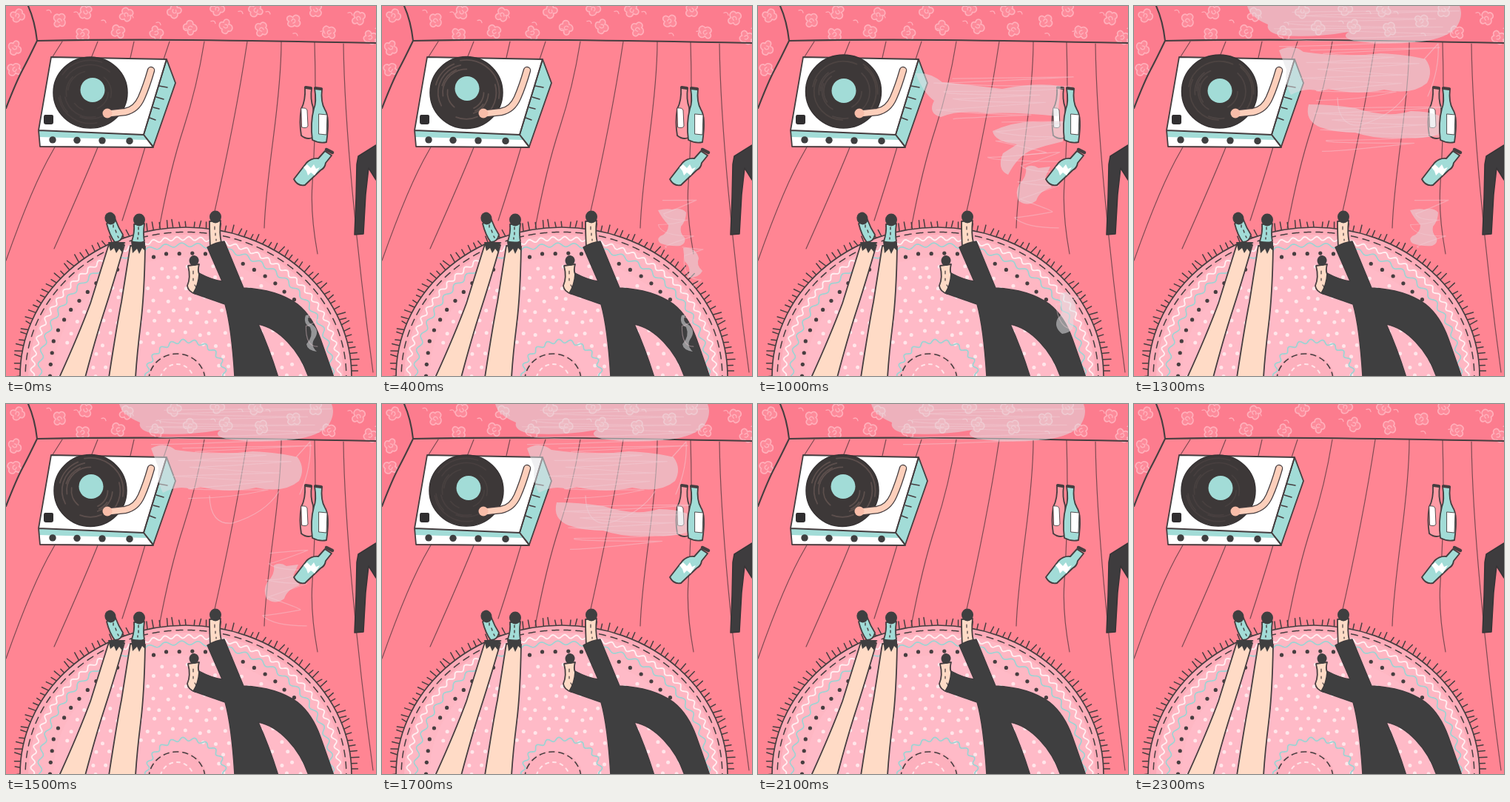
Recreate the animation shown at these times as an HTML page with a canvas. Size 500 by 500 pixels, loop 2400 ms.

```html
<!DOCTYPE html>
<html>
<head>
<meta charset="utf-8">
<style>
html, body { margin: 0; width: 100%; height: 100%; overflow: hidden; background: #ff8593; }
canvas { display: block; width: 100vw; height: 100vh; }
</style>
</head>
<body>
<canvas id="stage" width="500" height="500"></canvas>
<script>
const INK = '#463e40', TEAL = '#a2dcd7', SKIN = '#ffdbc6', BLACK = '#3f3f40';
const stage = document.getElementById('stage').getContext('2d');
const room = document.createElement('canvas');
room.width = room.height = 500;
let g = room.getContext('2d');

function seeded(seed) {
  return () => {
    seed = (seed * 16807) % 2147483647;
    return seed / 2147483647;
  };
}

function shape(d, fill, stroke, width = 1.8) {
  const p = new Path2D(d);
  if (fill) { g.fillStyle = fill; g.fill(p); }
  if (stroke) { g.strokeStyle = stroke; g.lineWidth = width; g.stroke(p); }
}

function oval(x, y, rx, ry, fill, stroke, width = 1.5, tilt = 0) {
  g.beginPath();
  g.ellipse(x, y, rx, ry, tilt, 0, Math.PI * 2);
  if (fill) { g.fillStyle = fill; g.fill(); }
  if (stroke) { g.strokeStyle = stroke; g.lineWidth = width; g.stroke(); }
}

function soften(ctx) { ctx.lineCap = ctx.lineJoin = 'round'; }

function drawFlower(x, y, turn) {
  g.save();
  g.translate(x, y);
  g.rotate(turn);
  shape('M-2 -4C-2 -11 9 -10 7 -3C13 -2 10 8 4 5C2 11 -8 9 -5 3C-12 2 -9 -8 -2 -4Z',
    'rgba(255,180,190,.25)', '#ffb0bb', 1.7);
  shape('M-2 1Q-2 -4 2 -2Q4 1 1 3', null, '#ffb0bb', 1.4);
  g.restore();
}

function drawWalls() {
  g.fillStyle = '#ff8593';
  g.fillRect(0, 0, 500, 500);
  shape('M0 0H500V50Q250 43 42 47L22 85L0 138Z', '#fc7c8e');
  const spots = [[15, 13], [12, 56], [12, 86], [72, 20], [103, 38], [108, 8], [152, 35], [162, 12],
    [203, 36], [228, 7], [249, 30], [285, 4], [297, 27], [338, 6], [345, 32], [388, 20],
    [419, 5], [437, 36], [476, 17], [492, 42]];
  spots.forEach(([x, y], i) => drawFlower(x, y, i * 1.7));
  const rnd = seeded(31);
  for (let x = 55; x < 500; x += 37) {
    const y = 6 + rnd() * 32;
    shape(`M${x} ${y}q5 -2 6 3`, null, '#ffadb9', 1.3);
  }
  shape('M30 0Q39 20 42 47Q150 45 250 46T500 50M42 47Q30 72 22 87T0 138', null, INK, 2.1);
}

function drawPlanks() {
  shape('M76 48L62 70M124 48L112 78Q90 150 63 196T0 344M173 48L168 70Q145 140 122 196T65 328' +
    'M221 48L213 72Q200 150 187 194T157 290M268 48Q258 110 240 165T207 300M326 48Q310 155 278 295' +
    'M372 48Q372 95 361 180T349 300M417 49Q420 150 414 240Q411 280 421 335' +
    'M456 51Q457 130 468 250T496 495', null, 'rgba(75,52,58,.72)', 1.2);
}

function drawTurntable() {
  shape('M61 69L217 72L186 174L44 168Z', '#fff');
  shape('M217 72L229 104L199 190L186 174Z', TEAL, INK);
  shape('M44 168L186 174L199 191L46 189Z', '#fff');
  shape('M44 168L186 174L191 181L45 177Z', TEAL);
  shape('M61 69L217 72L186 174L44 168ZM44 168L46 190L199 191L186 174', null, INK, 1.8);
  shape('M207 108L218 110M203 123L213 126M199 137L207 139M194 151L202 154', null, INK, 1.4);
  for (const x of [63, 96, 130, 167]) oval(x, 180 + x / 70, 4.7, 4.7, BLACK);
  shape('M53 147h9q2 0 2 2v8q0 3 -3 3h-7q-3 0 -3 -3v-7q0 -3 2 -3z', '#302e30');
}

const C = [243, 500], RX = 224, RY = 201;
function onRug(a, k) {
  return [C[0] + Math.cos(a) * RX * k, C[1] + Math.sin(a) * RY * k];
}

function wave(k, amp, count, color, width, from = Math.PI - .05, to = Math.PI * 2 + .05) {
  g.beginPath();
  for (let i = 0; i <= 360; i++) {
    const a = from + (to - from) * i / 360;
    g.lineTo(...onRug(a, k + Math.sin(i / 360 * count * 2 * Math.PI) * amp));
  }
  g.strokeStyle = color;
  g.lineWidth = width;
  g.stroke();
}

function drawRug() {
  const rnd = seeded(77);
  for (let i = 0; i <= 80; i++) {
    const a = Math.PI + i / 80 * Math.PI + rnd() * .012;
    const [x, y] = onRug(a, 1), n = 7 + rnd() * 5, b = a + (rnd() - .5) * .4;
    shape(`M${x} ${y}L${x + Math.cos(b) * n} ${y + Math.sin(b) * n}`, null, INK, 1.5);
  }
  oval(...C, RX, RY, '#fdabb8', INK, 1.7);
  oval(...C, RX * .95, RY * .95, '#feb7c3');
  oval(...C, RX * .8, RY * .8, '#ffbac7');
  g.setLineDash([9, 7]);
  wave(.968, 0, 0, INK, 1.5);
  g.setLineDash([]);
  wave(.925, .012, 42, '#fff0f2', 1.8);
  wave(.882, .013, 29, '#9ed3d3', 1.7);
  for (let i = 0; i < 34; i++) {
    oval(...onRug(Math.PI + i / 33 * Math.PI, .825 + (rnd() - .5) * .015), 2.6, 2.6, INK);
  }
  for (let y = 348; y < 500; y += 15) {
    for (let x = 70; x < 425; x += 17) {
      const px = x + (y % 2) * 8 + rnd() * 6, py = y + rnd() * 7;
      const inside = Math.hypot((px - C[0]) / RX, (py - C[1]) / RY) < .77;
      if (inside && Math.hypot(px - 231, py - 505) > 58) oval(px, py, 2.5, 2.5, '#ffe6ea');
    }
  }
  oval(231, 505, 40, 37, '#fdb0bd');
  wave(.235, .012, 11, '#9ed3d3', 1.8);
  g.setLineDash([7, 6]);
  oval(231, 506, 38, 36, null, INK, 1.6);
  g.setLineDash([4, 6]);
  oval(231, 508, 23, 24, null, '#ffe3e8', 2);
  g.setLineDash([]);
}

function drawBareLegs() {
  shape('M139 322L160 323Q145 375 133 412T107 502L72 502Q98 445 114 402Z', SKIN, INK);
  shape('M168 324L188 325Q187 390 182 430T175 502L139 502Q150 430 156 400Z', SKIN, INK);
  shape('M136 294L148 289Q152 300 158 309Q156 319 147 319Q140 310 136 294Z', TEAL, INK);
  shape('M173 295L187 294Q185 308 187 318Q180 322 170 318Q174 306 173 295Z', TEAL, INK);
  oval(141, 287, 7.5, 8.5, BLACK, null, 1, -.3);
  oval(180, 289, 8, 8.5, BLACK);
  shape('M138 319L160 319L157 333L153 328L149 334L146 327L141 331Z', BLACK);
  shape('M169 318L188 319L188 331L184 327L180 335L177 328L171 334Z', BLACK);
  shape('M145 296v3M148 303l1 3M151 311l1 2M179 299v3M179 306v3M178 313v2', null, INK, 1.4);
}

function drawTrousers() {
  shape('M275 291L290 290Q288 307 291 320L276 326Q275 306 275 291Z', SKIN, INK);
  shape('M246 351L261 349Q257 363 267 369L256 389Q246 386 245 378Q250 367 246 351Z', SKIN, INK);
  oval(283, 285, 8, 8.5, BLACK);
  oval(254, 344, 6.5, 7, BLACK, null, 1, .2);
  shape('M282 298v4M283 307v3M284 315v2M253 358v4M253 368v3M255 377l2 3', null, INK, 1.2);
  shape('M272 326Q284 319 295 318L321 381Q366 383 394 403Q414 419 425 450T443 502' +
    'L409 502C397 465 368 435 341 430Q356 463 368 502L309 502Q305 435 296 403' +
    'L253 388Q260 377 261 361Q278 370 292 372Z', BLACK, '#3d3b3d', 1.4);
}

function drawChair() {
  shape('M500 188L476 203L474 214L473 260L471 309L483 308L486 255L490 219L500 235Z', '#3e3c3e', '#363436', 1.5);
}

function drawPinkBottle() {
  shape('M404 110L413 111Q411 126 415 137Q417 160 414 178Q406 181 399 175Q396 157 399 139Q405 128 404 110Z', '#ff9ba5', INK);
  shape('M399 138q7 -1 8 3l1 21q-1 4 -8 2z', '#fff', INK, .9);
  shape('M405 110l7 1', null, INK, 4);
}

function drawTealBottles() {
  shape('M417 111L427 112Q425 130 431 140Q438 150 433 184Q423 186 414 181Q411 158 416 139Q420 130 417 111Z', TEAL, INK);
  shape('M423 146l11 1 -1 27 -10 -1z', '#fff', INK, .9);
  shape('M418 111l8 1', null, INK, 4);
  shape('M431 196L440 202L432 212Q431 219 425 222L404 242Q394 244 389 234L406 212Q413 205 422 206Z', TEAL, INK, 1.9);
  shape('M402 218L407 214L412 219L416 214L419 220L424 218L417 229L412 225L408 229L406 223Z', '#fff');
  shape('M433 194l8 4', null, INK, 4.5);
}

const DISCS = [
  { x: 114, y: 117, rx: 50, ry: 48, lx: 117, ly: 113.5, tone: .16 },
  { x: 114, y: 117, rx: 49, ry: 48.5, lx: 115, ly: 111.5, tone: .5 },
  { x: 115.5, y: 115.5, rx: 51, ry: 49.5, lx: 116, ly: 114.5, tone: .25 }
];

function drawDisc(n) {
  const d = DISCS[n], rnd = seeded(11 + n * 53);
  oval(d.x, d.y, d.rx, d.ry, '#3d3838', '#353132', 1.5);
  for (let i = 0; i < 11; i++) {
    const k = .48 + i * .043, a = rnd() * 6.3;
    g.beginPath();
    g.ellipse(d.x, d.y, d.rx * k, d.ry * k, 0, a, a + .5 + rnd() * 1.5);
    g.strokeStyle = `rgba(125,103,98,${d.tone})`;
    g.lineWidth = 1.8;
    g.stroke();
  }
  oval(d.lx, d.ly, 16.5, 16.5, TEAL);
}

function drawArm() {
  const arm = 'M196 87Q190 108 183 124Q176 140 161 143L138 145.5';
  shape(arm, null, INK, 10.5);
  shape(arm, null, '#fdcfbb', 8);
  oval(137, 145, 6.5, 6.5, '#f8bda9');
}

// Each puff: outline, scribble box [x, y, w, h], strokes, [first, end) steps in tenths of a second.
const PUFFS = [
  ['M405 418Q401 429 411 434Q416 446 406 457Q407 465 420 467Q410 458 418 448Q424 437 413 430Q405 426 410 417Z',
    [404, 415, 19, 51], 3, [0, 2, 4, 6, 7, 9]],
  ['M408 391Q418 381 424 394Q434 407 426 424Q429 441 411 443Q399 434 405 422Q415 413 408 404Z',
    [402, 382, 34, 62], 3, [2, 4, 6, 7, 9, 12]],
  ['M407 327Q424 325 428 341Q424 350 433 358Q428 368 412 367Q420 355 409 345Z',
    [399, 318, 35, 78], 4, [3, 6]],
  ['M373 276Q385 273 392 275Q405 272 411 279Q411 290 404 298Q402 307 409 313Q411 321 403 324Q389 325 377 321Q370 316 376 311Q387 307 387 296Q377 285 373 276Z',
    [368, 255, 57, 77], 6, [4, 7, 12, 14]],
  ['M362 218Q370 213 379 219L395 217L388 232L397 245Q380 250 376 263Q364 272 352 263Q347 251 353 241Q364 230 362 218Z',
    [344, 190, 64, 116], 9, [6, 8, 9, 12, 14, 16]],
  ['M317 169Q350 154 382 157L414 156L412 183Q390 188 369 195Q351 203 338 228Q322 221 331 199L350 187Q319 183 317 169Z',
    [307, 150, 113, 70], 7, [8, 11]],
  ['M213 91Q232 89 249 103Q290 107 330 112Q374 103 409 108L405 149Q348 143 310 145Q273 139 247 150Q229 145 238 128Q223 117 213 91Z',
    [222, 92, 205, 62], 10, [9, 12]],
  ['M236 133Q266 133 299 138Q343 152 374 142Q398 142 412 148L413 172Q398 180 369 178Q327 181 299 171Q273 171 252 164Q230 155 236 133Z',
    [238, 132, 190, 66], 10, [12, 14, 16, 19]],
  ['M196 60Q214 50 229 62Q286 70 333 64Q372 66 394 72Q405 87 396 104Q376 121 338 113Q301 121 263 112L250 115Q232 109 212 120Q203 104 206 86Z',
    [195, 52, 219, 76], 12, [11, 21], 'M275 124Q276 164 306 161Q350 148 369 118M392 72L411 51Q413 86 397 122'],
  ['M153 0L440 0Q446 15 434 31Q417 46 380 49Q335 53 297 47Q279 42 290 35Q245 43 200 40Q178 36 181 25Q157 15 153 0Z',
    [157, 3, 284, 53], 10, [13, 19, 21, 23]]
];

// Loose strokes sweep across the box, as if drawn back and forth with a thin brush.
function drawPuff([outline, [x, y, w, h], strokes, , extra], i) {
  const rnd = seeded(901 + i * 137);
  shape(outline, 'rgba(225,225,228,.53)');
  let d = `M${x + w * .2} ${y + h * .1}`;
  for (let k = 0; k < strokes; k++) {
    const side = k % 2 ? rnd() * .3 : 1 - rnd() * .3, level = (k + rnd()) / strokes;
    d += `Q${x + w * rnd()} ${y + h * level} ${x + w * side} ${y + h * level}`;
  }
  shape(d, null, 'rgba(240,208,215,.42)', 1.2);
  if (extra) shape(extra, null, 'rgba(240,208,215,.5)', 1.2);
}

function visible(times, step) {
  for (let i = 0; i < times.length; i += 2) {
    if (step >= times[i] && step < times[i + 1]) return true;
  }
  return false;
}

soften(g);
drawWalls();
drawPlanks();
drawTurntable();
drawRug();
drawBareLegs();
drawTrousers();
drawChair();
drawPinkBottle();

g = stage;
soften(g);
let last = -1;

function render(now) {
  const step = Math.floor(now / 100) % 24;
  if (step !== last) {
    last = step;
    g.drawImage(room, 0, 0);
    drawDisc((step < 7 ? step : step + 1) % 3);
    drawArm();
    PUFFS.forEach((p, i) => { if (visible(p[3], step)) drawPuff(p, i); });
    drawTealBottles();
  }
}

const start = performance.now();
function tick() {
  render(performance.now() - start);
  requestAnimationFrame(tick);
}
tick();
</script>
</body>
</html>
```
